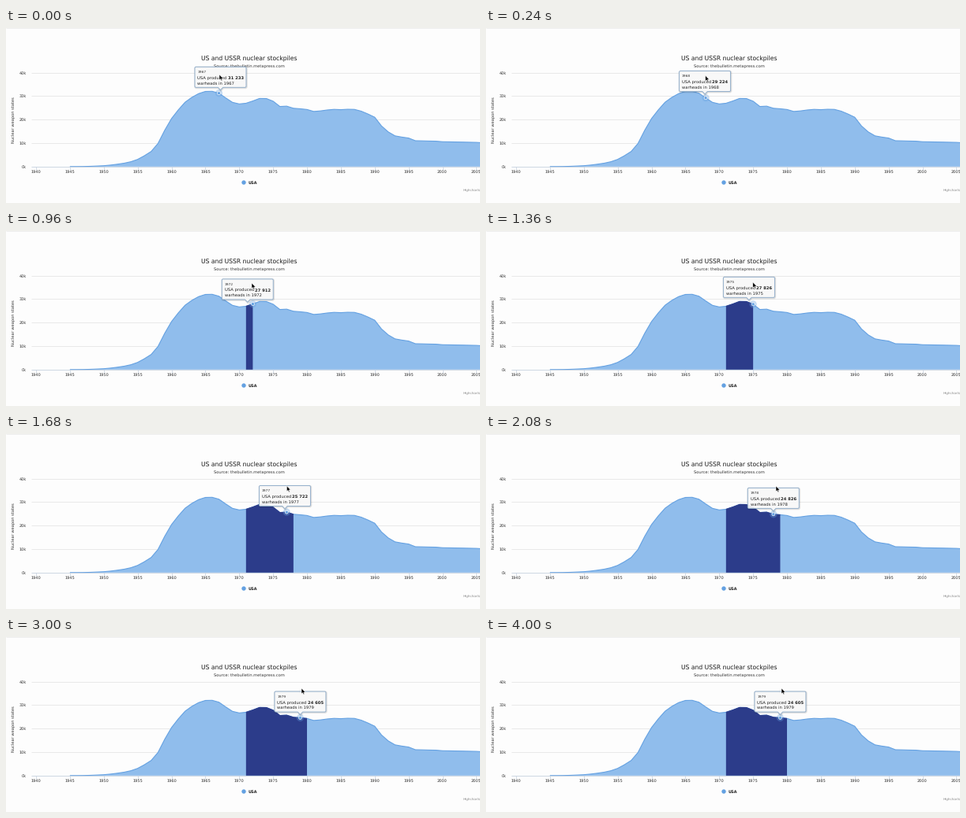
A matplotlib script that plays this animation: 600x222 px, repeating every 4680 ms.

```python
import math

import matplotlib.pyplot as plt
import numpy as np
from matplotlib.animation import FuncAnimation
from matplotlib.patches import Circle, PathPatch, Polygon
from matplotlib.path import Path

WIDTH, HEIGHT, DPI = 600, 222, 100
FRAMES, INTERVAL = 117, 40
PX = 72 / DPI

FIRST_YEAR = 1945
WARHEADS = np.array([
    6, 11, 32, 110, 235, 369, 640, 1005, 1436, 2063, 3057, 4618, 6444, 9822,
    15468, 20434, 24126, 27387, 29459, 31056, 31982, 32040, 31233, 29224,
    27342, 26662, 26956, 27912, 28999, 28965, 27826, 25579, 25722, 24826,
    24605, 24304, 23464, 23708, 24099, 24357, 24237, 24401, 24344, 23586,
    22380, 21004, 17287, 14747, 13076, 12555, 12144, 11009, 10950, 10871,
    10824, 10577, 10527, 10475, 10421, 10358, 10295, 10104])
YEARS = FIRST_YEAR + np.arange(len(WARHEADS))

BLUE, FILL, NAVY = "#64a1e2", "#90bdec", "#2c3c8a"
GRID, AXIS, INK = "#e4e4e4", "#c3cfdd", "#333333"
BAND_START = 1971
TIP_W, TIP_H, TIP_RISE = 65, 26, 33.4

plt.rcParams["font.family"] = "DejaVu Sans"
plt.rcParams["text.hinting"] = "none"


def x_of(year):
    return 38 + (year - 1940) * 8.575


def y_of(count):
    return 175.8 - count * 0.00298


def year_at(x):
    return 1940 + (x - 38) / 8.575


def point(year):
    return x_of(year), y_of(WARHEADS[year - FIRST_YEAR])


# Pointer path: frame, x, y
POINTER = np.array([
    (0, 270, 59), (14, 288, 62), (18, 288, 62), (21, 300, 64), (24, 311, 66),
    (32, 325.7, 65.5), (33, 334, 65), (34, 337.8, 65), (44, 359.8, 66),
    (46, 362, 66), (52, 367, 66), (57, 368.5, 65.5), (60, 371, 65),
    (61, 373, 65), (63, 374, 65)])


def pointer_at(frame):
    return tuple(np.interp(frame, POINTER[:, 0], POINTER[:, i]) for i in (1, 2))


def hovered_year(frame):
    return math.floor(year_at(pointer_at(frame)[0]) + 0.5)


def tooltip_track():
    """Box centre and top per frame, easing toward the hovered point."""
    pos = np.array([271.5, point(1967)[1] - TIP_RISE])
    track = [pos]
    for frame in range(1, FRAMES):
        x, y = point(hovered_year(frame))
        pos = pos + 0.4 * (np.array([x, y - TIP_RISE]) - pos)
        track.append(pos)
    return track


def tooltip_outline():
    """Rounded box with a callout; the origin is the top centre."""
    w, h, r = TIP_W / 2, TIP_H, 1.6
    steps = [
        (Path.MOVETO, (-w + r, 0)), (Path.LINETO, (w - r, 0)),
        (Path.CURVE3, (w, 0)), (Path.CURVE3, (w, r)),
        (Path.LINETO, (w, h - r)),
        (Path.CURVE3, (w, h)), (Path.CURVE3, (w - r, h)),
        (Path.LINETO, (3.2, h)), (Path.LINETO, (0, h + 3.4)),
        (Path.LINETO, (-3.2, h)), (Path.LINETO, (-w + r, h)),
        (Path.CURVE3, (-w, h)), (Path.CURVE3, (-w, h - r)),
        (Path.LINETO, (-w, r)),
        (Path.CURVE3, (-w, 0)), (Path.CURVE3, (-w + r, 0)),
        (Path.CLOSEPOLY, (-w + r, 0))]
    return np.array([p for _, p in steps]), [c for c, _ in steps]


fig = plt.figure(figsize=(WIDTH / DPI, HEIGHT / DPI), dpi=DPI, facecolor="#fdfdfd")
ax = fig.add_axes([0, 0, 1, 1])
ax.set_xlim(0, WIDTH)
ax.set_ylim(HEIGHT, 0)
ax.axis("off")


def text(x, y, label, size, color=INK, ha="left", **kw):
    kw.setdefault("va", "baseline")
    return ax.text(x, y, label, fontsize=size * PX, color=color, ha=ha, **kw)


def line(xs, ys, color, width, z=1):
    return ax.plot(xs, ys, color=color, lw=width * PX, zorder=z,
                   solid_capstyle="butt")[0]


def area_points(years):
    xs, ys = x_of(years), y_of(WARHEADS[years - FIRST_YEAR])
    base = y_of(0)
    return np.column_stack([np.r_[xs[0], xs, xs[-1]], np.r_[base, ys, base]])


# Page and axes
for y in (0.5, 221.5):
    line([0, WIDTH], [y, y], "#eeeeee", 1)
for count in range(0, 50000, 10000):
    y = y_of(count)
    if count:
        line([32, WIDTH], [y, y], GRID, 0.8)
    text(26, y + 1.9, f"{count // 1000}k", 5, ha="right")
line([32, WIDTH], [176, 176], AXIS, 0.8, 4)
for year in range(1940, 2010, 5):
    line([x_of(year)] * 2, [176, 180], AXIS, 0.7, 4)
    text(x_of(year), 184.3, year, 4.95, ha="center")

text(308, 40, "US and USSR nuclear stockpiles", 7.66, "#1c1c1c", "center")
text(308, 49.5, "Source: thebulletin.metapress.com", 5.12, INK, "center")
text(10, 116.5, "Nuclear weapon states", 5.15, INK, "center",
     va="center", rotation=90)
ax.add_patch(Circle((301, 196), 2.7, fc=BLUE, ec="none"))
text(307, 198.3, "USA", 5, "#222222", weight="bold")
text(578.5, 206, "Highcharts.com", 4.1, "#888888", clip_on=True)

# Series and selected band
outline = area_points(YEARS)
ax.add_patch(Polygon(outline, fc=FILL, ec="none", zorder=2))
line(outline[1:-1, 0], outline[1:-1, 1], BLUE, 1.1, 3)
band = Polygon(area_points(YEARS[:2]), fc=NAVY, ec="none", zorder=3.2)
ax.add_patch(band)
band_line = line([], [], NAVY, 1.1, 3.3)

# Hover marker
halo = Circle((0, 0), 4.6, fc=BLUE, ec="none", alpha=0.35, zorder=5)
marker = Circle((0, 0), 2, fc=BLUE, ec="white", lw=0.6 * PX, zorder=6)
for patch in (halo, marker):
    ax.add_patch(patch)

# Tooltip
tip_verts, tip_codes = tooltip_outline()
tip_path = Path(tip_verts, tip_codes)
shadows = [PathPatch(tip_path, fc="none", ec="black", alpha=0.07,
                     lw=w * PX, zorder=7) for w in (1.6, 2.8)]
tip = PathPatch(tip_path, fc=(0.972, 0.972, 0.972, 0.93), ec="#8eacca",
                lw=0.9 * PX, zorder=8)
for patch in (*shadows, tip):
    ax.add_patch(patch)
head = text(0, 0, "", 4.4, zorder=9)
lead = text(0, 0, "USA produced", 5.2, "#222222", zorder=9)
amount = text(0, 0, "", 5.2, "#222222", weight="bold", zorder=9)
tail = text(0, 0, "", 5.2, "#222222", zorder=9)

# Mouse pointer
ARROW = np.array([(0, 0), (0, 7), (1.6, 5.6), (2.7, 8.1), (3.8, 7.6),
                  (2.8, 5.2), (4.9, 5.1)])
pointer = Polygon(ARROW, fc="black", ec="white", lw=0.5 * PX, zorder=10)
ax.add_patch(pointer)

TRACK = tooltip_track()


def update(frame):
    px, py = pointer_at(frame)
    pointer.set_xy(ARROW + (px, py))

    end = math.ceil(year_at(px))
    selected = end > BAND_START
    band.set_visible(selected)
    band_line.set_visible(selected)
    if selected:
        shape = area_points(np.arange(BAND_START, end + 1))
        band.set_xy(shape)
        band_line.set_data(shape[1:-1, 0], shape[1:-1, 1])

    year = hovered_year(frame)
    halo.center = marker.center = point(year)

    cx, top = TRACK[frame]
    tip.set_path(Path(tip_verts + (cx, top), tip_codes))
    for shadow in shadows:
        shadow.set_path(Path(tip_verts + (cx + 0.5, top + 0.6), tip_codes))
    left = cx - TIP_W / 2 + 3.4
    head.set_text(str(year))
    amount.set_text(f"{WARHEADS[year - FIRST_YEAR]:,}".replace(",", " "))
    tail.set_text(f"warheads in {year}")
    for label, dx, dy in ((head, 0, 8.9), (lead, 0, 15.5),
                          (amount, 38.4, 15.5), (tail, 0, 22.2)):
        label.set_position((left + dx, top + dy))
    return band, band_line, halo, marker, tip, head, lead, amount, tail, pointer


anim = FuncAnimation(fig, update, frames=FRAMES, interval=INTERVAL,
                     repeat=True, repeat_delay=0, blit=False)
plt.show()
```
